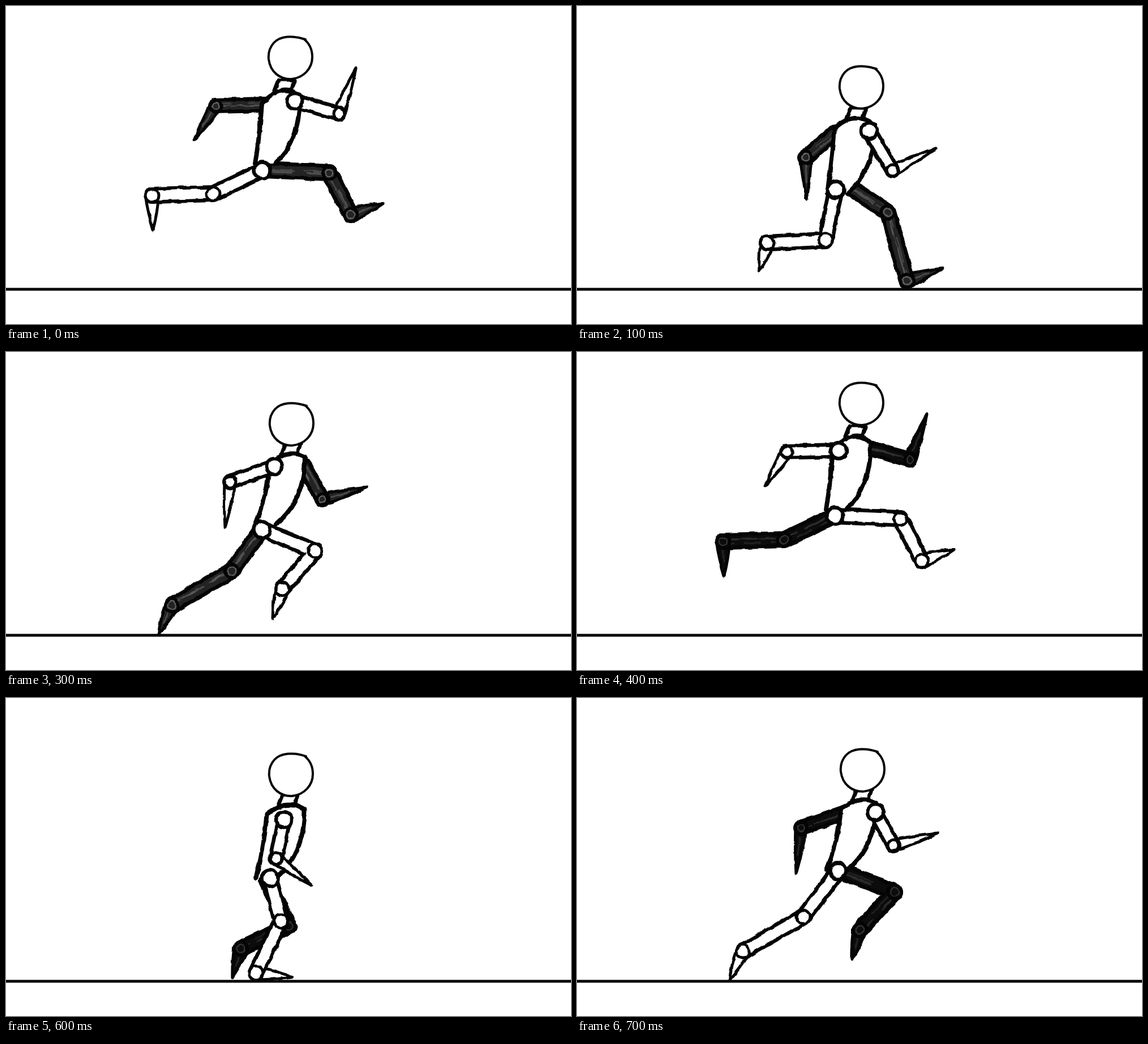
Animation, 998 px wide and 561 px high, one loop 800 ms. Source, as an HTML page:

```html
<!DOCTYPE html>
<html lang="en">
<head>
<meta charset="utf-8">
<title>Run cycle</title>
<style>
  html, body { margin: 0; width: 100%; height: 100%; overflow: hidden; background: #fff; }
  svg { display: block; width: 100%; height: 100%; }
</style>
</head>
<body>
<svg id="stage" viewBox="0 0 998 561" preserveAspectRatio="none" fill="none" stroke-linecap="round" stroke-linejoin="round">
  <filter id="rough" filterUnits="userSpaceOnUse" x="0" y="0" width="998" height="561" color-interpolation-filters="sRGB">
    <feTurbulence type="fractalNoise" baseFrequency="0.06" numOctaves="2" seed="4"/>
    <feDisplacementMap in="SourceGraphic" scale="5" xChannelSelector="R" yChannelSelector="G"/>
  </filter>
</svg>
<script>
const STEP = 100;
const GROUND = 499.8;
const INK = '#040404';
const PAPER = { fill: '#fff' };
const GREY = { fill: '#232323', streak: '#666' };
const BLACK = { fill: '#0c0c0c', streak: '#363636' };
const ARM = { width: 27, joint: 10, root: 14 };
const LEG = { width: 29, joint: 12, root: 14.5 };
const stage = document.getElementById('stage');

let seed = 7;
const rand = () => (seed = (seed * 16807) % 2147483647) / 2147483647;

function add(parent, tag, attrs) {
  const el = document.createElementNS('http://www.w3.org/2000/svg', tag);
  for (const key in attrs) el.setAttribute(key, attrs[key]);
  return parent.appendChild(el);
}
const stroke = (g, d, color, width, more) =>
  add(g, 'path', { d, stroke: color, 'stroke-width': width, ...more });

const plus = ([x, y], dx, dy) => [x + dx, y + dy];
const mean = (a, b) => a.map((v, i) => (v + b[i]) / 2);
const points = flat => flat.flatMap((v, i) => i % 2 ? [] : [[v, flat[i + 1]]]);

// Key poses. Arms: shoulder, elbow, hand. Legs: hip, knee, ankle, toe.
// Body: back shoulder, base of neck, front shoulder, pelvis.
function keyPose({ head, body, armB, armF, legB, legF }) {
  return {
    head, body: points(body),
    armB: points(armB), armF: points(armF), legB: points(legB), legF: points(legF)
  };
}

const flight = keyPose({
  head: [0, 0],
  body: [452, 172, 489, 149, 519, 162, 454, 284],
  armB: [462, 174, 371, 176, 332, 237],
  armF: [510, 168, 588, 190, 618, 110],
  legB: [453, 290, 366, 331, 258, 334, 260, 395],
  legF: [456, 289, 571, 294, 609, 369, 667, 348]
});
const contact = keyPose({
  head: [0, 52],
  body: [455, 216, 490, 198, 527, 210, 456, 337],
  armB: [456, 223, 404, 267, 406, 340],
  armF: [516, 220, 557, 290, 634, 251],
  legB: [457, 324, 439, 413, 336, 418, 322, 468],
  legF: [485, 321, 549, 364, 583, 485, 646, 463]
});
const contactWide = {
  ...contact,
  armB: points([455, 228, 398, 272, 398, 346]),
  armF: points([525, 228, 551, 285, 630, 245]),
  legB: points([452, 338, 428, 414, 332, 418, 317, 468]),
  legF: points([471, 330, 548, 373, 583, 484, 643, 471])
};
const push = keyPose({
  head: [2, 36],
  body: [466, 195, 500, 180, 528, 185, 455, 311],
  armB: [474, 202, 396, 229, 387, 310],
  armF: [527, 202, 559, 260, 638, 239],
  legB: [450, 315, 399, 386, 293, 447, 269, 498],
  legF: [452, 313, 546, 351, 488, 418, 471, 470]
});
const pushHigh = {
  ...push,
  legB: points([461, 305, 400, 386, 293, 447, 269, 498]),
  legF: points([470, 307, 561, 342, 500, 409, 485, 461])
};

// lead 'F': front arm and back leg are on the near side; 'B': the reverse.
function arrange({ head, body, ...limbs }, lead) {
  const other = lead === 'F' ? 'B' : 'F';
  return {
    head, body, planted: lead === 'F' ? 'farLeg' : 'nearLeg',
    nearArm: limbs['arm' + lead], farArm: limbs['arm' + other],
    nearLeg: limbs['leg' + other], farLeg: limbs['leg' + lead]
  };
}

// Halfway between two limbs: each bone turns by half the angle.
function halfway(a, b) {
  const out = [mean(a[0], b[0])];
  const polar = (limb, i) => {
    const dx = limb[i][0] - limb[i - 1][0], dy = limb[i][1] - limb[i - 1][1];
    return [Math.hypot(dx, dy), Math.atan2(dy, dx)];
  };
  for (let i = 1; i < a.length; i++) {
    const [len, turn] = mean(polar(a, i), polar(b, i));
    out.push(plus(out[i - 1], len * Math.cos(turn), len * Math.sin(turn)));
  }
  return out;
}

// The standing leg is compressed until its foot lies flat on the ground.
function plant([hip, knee, ankle]) {
  const k = (GROUND - 15 - hip[1]) / (ankle[1] - hip[1]);
  const press = ([x, y]) => [x, hip[1] + (y - hip[1]) * k];
  return [hip, press(knee), press(ankle), plus(press(ankle), 64, 8)];
}

function passing(from, to) {
  const pose = { head: mean(from.head, to.head), body: from.body.map((p, i) => mean(p, to.body[i])) };
  for (const name of ['nearArm', 'farArm', 'nearLeg', 'farLeg']) pose[name] = halfway(from[name], to[name]);
  pose[from.planted] = plant(pose[from.planted]);
  return pose;
}

function halfCycle(hit, off, lead) {
  const start = arrange(hit, lead);
  const end = arrange(off, lead === 'F' ? 'B' : 'F');
  return [arrange(flight, lead), start, passing(start, end), end];
}
const poses = [...halfCycle(contact, push, 'F'), ...halfCycle(contactWide, pushHigh, 'B')];

function ring(g, [cx, cy], r, tone, width = 5) {
  add(g, 'circle', { cx, cy, r, fill: tone.fill, stroke: INK, 'stroke-width': width });
  if (tone.streak) add(g, 'circle', { cx, cy, r: r * 0.6, stroke: tone.streak, 'stroke-width': 2 });
}

// Forearm or foot: a spike with slightly rounded flanks.
function spike(g, [x, y], [X, Y], half, tone) {
  const len = Math.hypot(X - x, Y - y);
  const nx = (y - Y) / len, ny = (X - x) / len;
  const at = (t, w) => plus([x + (X - x) * t, y + (Y - y) * t], nx * w, ny * w);
  const bulge = half * 0.7;
  const d = `M${at(0, half)}Q${at(0.5, bulge)} ${X} ${Y}Q${at(0.5, -bulge)} ${at(0, -half)}Z`;
  add(g, 'path', { d, fill: tone.fill, stroke: INK, 'stroke-width': 5 });
  if (tone.streak) stroke(g, `M${at(0.2, 0)}L${at(0.6, 0)}`, tone.streak, 3, { 'stroke-opacity': 0.6 });
}

function drawLimb(g, limb, { width, joint, root }, tone) {
  const bones = limb.slice(0, -1);
  const d = 'M' + bones.join('L');
  spike(g, bones.at(-1), limb.at(-1), joint, tone);
  stroke(g, d, INK, width + 1);
  stroke(g, d, tone.fill, width - 12);
  if (tone.streak) for (let i = 0; i < 3; i++) {
    stroke(g, d, tone.streak, 1.5 + rand() * 2, {
      'stroke-opacity': 0.3 + rand() * 0.5,
      'stroke-dasharray': `${20 + rand() * 40} ${10 + rand() * 30}`,
      transform: `translate(${rand() * 8 - 4} ${rand() * 8 - 4})`
    });
  }
  bones.slice(1).forEach(p => ring(g, p, joint, tone));
  if (tone === PAPER) ring(g, bones[0], root, tone, 6.5);
}

function drawBody(g, [back, neck, front, pelvis]) {
  for (const side of [-14, 14]) stroke(g, `M${plus(neck, side, 0)}l7 -18`, INK, 7);
  stroke(g, `M${plus(neck, -7, -18)}h28`, INK, 5);
  const mid = mean(back, front);
  const top = [2 * neck[0] - mid[0], 2 * neck[1] - mid[1]];
  const d = `M${plus(pelvis, -14, -7)}Q${plus(back, -4, 58)} ${back}` +
    `Q${top} ${front}Q${plus(front, 0, 76)} ${plus(pelvis, 22, -7)}`;
  add(g, 'path', { d, fill: '#fff', stroke: INK, 'stroke-width': 8 });
}

function drawHead(g, [dx, dy]) {
  add(g, 'path', {
    d: 'M529 59C505 51 484 53 473 65C465 74 463 84 464 94C467 117 484 129 503 129C526 127 541 110 541 90C541 77 536 66 526 58',
    transform: `translate(${dx} ${dy})`, fill: '#fff', stroke: INK, 'stroke-width': 4
  });
}

function drawPose(pose, i) {
  const g = add(stage, 'g', {});
  stroke(g, `M-5 ${GROUND}H1003`, INK, 5);
  const figure = add(g, 'g', { filter: 'url(#rough)' });
  const shade = i < poses.length / 2 ? GREY : BLACK;
  drawLimb(figure, pose.farArm, ARM, shade);
  drawLimb(figure, pose.farLeg, LEG, shade);
  drawBody(figure, pose.body);
  drawLimb(figure, pose.nearLeg, LEG, PAPER);
  drawLimb(figure, pose.nearArm, ARM, PAPER);
  drawHead(g, pose.head);
  return g;
}

const groups = poses.map(drawPose);

function render(time) {
  const now = Math.floor(time / STEP) % groups.length;
  groups.forEach((g, i) => g.setAttribute('display', i === now ? 'inline' : 'none'));
}

function tick() {
  render(performance.now());
  requestAnimationFrame(tick);
}
tick();
</script>
</body>
</html>
```
